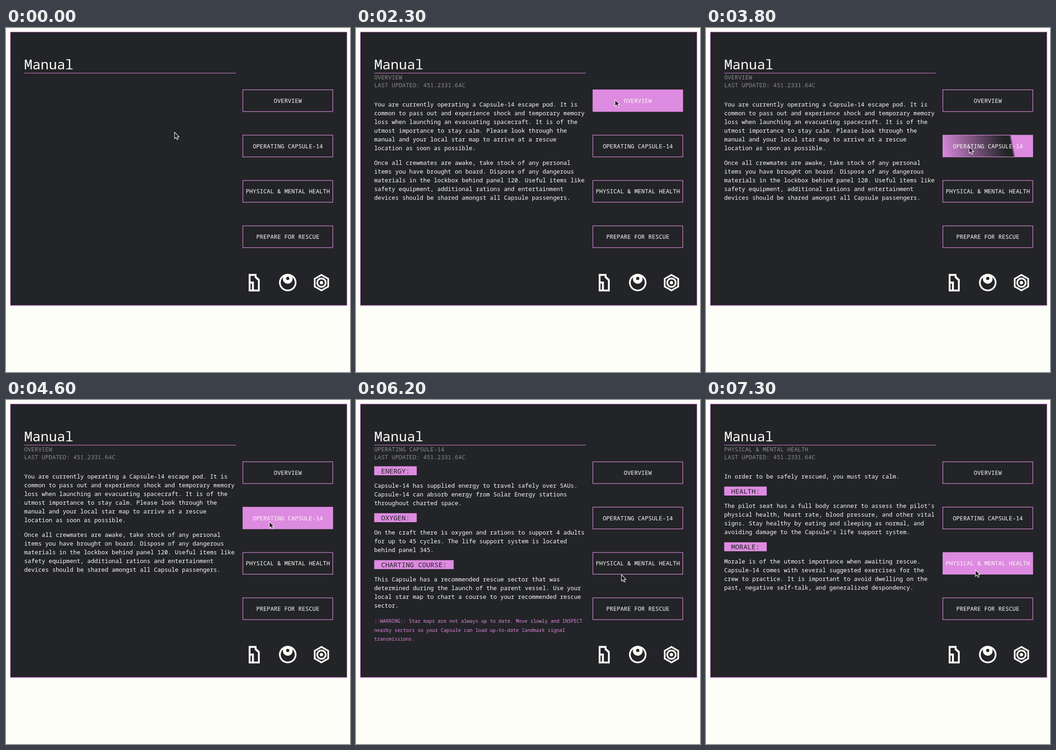
An HTML page that plays this animation: 747x749 px, repeating every 7.7 s.

```html
<!DOCTYPE html>
<html lang="en">
<head>
<meta charset="utf-8">
<title>Manual</title>
<style>
html, body { margin: 0; width: 100%; height: 100%; overflow: hidden; background: #fdfef8; }
svg { display: block; width: 747px; height: 749px; }
text { font-family: "Noto Sans Mono", "DejaVu Sans Mono", monospace; font-size: 12.7px; font-weight: 500; fill: #fcfdf6; }
.title { font-size: 29.7px; font-weight: 400; }
.meta { fill: #8b8b8a; font-weight: 400; }
.head { font-size: 14.85px; font-weight: 400; fill: #232427; }
.warn { font-size: 10.47px; fill: #dd8be0; }
.label { text-anchor: middle; }
</style>
</head>
<body>
<svg id="stage" viewBox="0 0 747 749"></svg>
<script>
const PINK = '#dd8be0', DARK = '#232427', LIGHT = '#fcfdf6';
const LOOP = 7700, FILL_MS = 350;
const stage = document.getElementById('stage');

function add(parent, tag, attrs = {}, content) {
  const el = document.createElementNS('http://www.w3.org/2000/svg', tag);
  for (const key in attrs) el.setAttribute(key, attrs[key]);
  if (content) el.textContent = content;
  return parent.appendChild(el);
}
const text = (parent, x, y, cls, str) => add(parent, 'text', { x, y, class: cls }, str);
const lines = (parent, y, rows, cls = 'body', step = 19.05) =>
  rows.forEach((row, i) => text(parent, 39.5, y + i * step, cls, row));

function heading(parent, y, str) {
  add(parent, 'rect', { x: 39.5, y, width: str.length * 8.91 + 30, height: 19.5, fill: PINK });
  text(parent, 54.5, y + 15.3, 'head', str);
}

function page(topic) {
  const g = add(stage, 'g', { display: 'none' });
  text(g, 39.5, 112, 'meta', topic);
  text(g, 39.5, 128.5, 'meta', 'LAST UPDATED: 451.2331.64C');
  return g;
}

// Panel
add(stage, 'rect', { width: 747, height: 749, fill: '#fdfef8' });
add(stage, 'rect', { x: 9.3, y: 8.6, width: 731.2, height: 595.6, fill: DARK, stroke: PINK, 'stroke-width': 1.2 });
text(stage, 39.5, 89.5, 'title', 'Manual');
add(stage, 'path', { d: 'M39.5 98.2H499', stroke: PINK, 'stroke-width': 1.1 });

// Pages
const topics = ['OVERVIEW', 'OPERATING CAPSULE-14', 'PHYSICAL & MENTAL HEALTH', 'PREPARE FOR RESCUE'];
const [overview, operating, health] = topics.slice(0, 3).map(page);

lines(overview, 171, [
  'You are currently operating a Capsule-14 escape pod. It is',
  'common to pass out and experience shock and temporary memory',
  'loss when launching an evacuating spacecraft. It is of the',
  'utmost importance to stay calm. Please look through the',
  'manual and your local star map to arrive at a rescue',
  'location as soon as possible.'
]);
lines(overview, 298, [
  'Once all crewmates are awake, take stock of any personal',
  'items you have brought on board. Dispose of any dangerous',
  'materials in the lockbox behind panel 120. Useful items like',
  'safety equipment, additional rations and entertainment',
  'devices should be shared amongst all Capsule passengers.'
]);

heading(operating, 144.3, 'ENERGY:');
lines(operating, 190.5, [
  'Capsule-14 has supplied energy to travel safely over 5AUs.',
  'Capsule-14 can absorb energy from Solar Energy stations',
  'throughout charted space.'
]);
heading(operating, 246.5, 'OXYGEN:');
lines(operating, 292.8, [
  'On the craft there is oxygen and rations to support 4 adults',
  'for up to 45 cycles. The life support system is located',
  'behind panel 345.'
]);
heading(operating, 348.7, 'CHARTING COURSE:');
lines(operating, 395, [
  'This Capsule has a recommended rescue sector that was',
  'determined during the launch of the parent vessel. Use your',
  'local star map to chart a course to your recommended rescue',
  'sector.'
]);
lines(operating, 485.3, [
  '::WARNING:: Star maps are not always up to date. Move slowly and INSPECT',
  'nearby sectors so your Capsule can load up-to-date landmark signal',
  'transmissions.'
], 'warn', 19.5);

lines(health, 171, ['In order to be safely rescued, you must stay calm.']);
heading(health, 188.5, 'HEALTH:');
lines(health, 235, [
  'The pilot seat has a full body scanner to assess the pilot’s',
  'physical health, heart rate, blood pressure, and other vital',
  'signs. Stay healthy by eating and sleeping as normal, and',
  'avoiding damage to the Capsule’s life support system.'
]);
heading(health, 309.8, 'MORALE:');
lines(health, 356.3, [
  'Morale is of the utmost importance when awaiting rescue.',
  'Capsule-14 comes with several suggested exercises for the',
  'crew to practice. It is important to avoid dwelling on the',
  'past, negative self-talk, and generalized despondency.'
]);

// Buttons, each with its own slanted sweep
const defs = add(stage, 'defs');
const buttons = topics.map((label, i) => {
  const y = 134.5 + i * 98.75;
  const sweep = add(defs, 'linearGradient', {
    id: 'sweep' + i, gradientUnits: 'userSpaceOnUse',
    x1: -155, y1: y + 53, x2: 0, y2: y + 24
  });
  [[0, PINK], [0.88, DARK], [0.97, DARK], [1, PINK]].forEach(([offset, color]) =>
    add(sweep, 'stop', { offset, 'stop-color': color }));
  const box = add(stage, 'rect', { x: 514.4, y, width: 195.2, height: 47.4, fill: 'none', stroke: PINK, 'stroke-width': 1.2 });
  text(stage, 612, y + 28.4, 'label', label);
  return { sweep, box };
});

// Icons
add(stage, 'path', {
  d: 'M527 535.5H544V541L551 547.5V573.5H527ZM531 539.8V552H538.3V569.4H547V550L540 543.5V539.8ZM531 556.5V569.4H534V556.5Z',
  fill: LIGHT, 'fill-rule': 'evenodd'
});
const disc = (cx, cy, r, fill) => add(stage, 'circle', { cx, cy, r, fill });
const hexagon = (r, fill) => add(stage, 'polygon', {
  points: [0, 1, 2, 3, 4, 5].map(k => {
    const a = (k * 60 - 90) * Math.PI / 180;
    return [685 + r * Math.cos(a), 554.5 + r * Math.sin(a)].join();
  }).join(' '), fill
});
disc(611.8, 554.3, 19, LIGHT);
disc(611.8, 554.3, 15.3, DARK);
disc(611.8, 546.3, 10.6, LIGHT);
disc(611.8, 545.2, 3.5, DARK);
hexagon(19, LIGHT);
hexagon(14.8, DARK);
disc(685, 554.5, 11, LIGHT);
disc(685, 554.5, 7.3, DARK);
disc(685, 554.5, 3.7, LIGHT);

const cursor = add(stage, 'path', {
  d: 'M0 0V14L3.3 10.9L5.5 16L7.9 15L5.8 10.1H10Z',
  fill: '#121214', stroke: LIGHT, 'stroke-width': 1.1, 'stroke-linejoin': 'round'
});

// Timeline: cursor [ms, x, y], hover [button, from, to], page start [ms, group]
const path = [
  [0, 366, 227], [1080, 366, 227], [1600, 550.5, 158], [1850, 562.5, 156.5], [3220, 562.5, 156.5],
  [3900, 572, 265], [5400, 572, 265], [6150, 576.5, 380.5], [6230, 576.5, 380.5], [6650, 585, 370], [LOOP, 585, 370]
];
const hovers = [[0, 1500, 3400], [1, 3690, 5580], [2, 5850, 6140], [2, 6300, LOOP]];
const shows = [[2250, overview], [4800, operating], [6750, health]];

const ease = p => p * p * (3 - 2 * p);

function cursorAt(t) {
  const i = path.findIndex(k => k[0] > t);
  const [t0, x0, y0] = path[i - 1], [t1, x1, y1] = path[i];
  const p = (t - t0) / (t1 - t0), e = ease(p);
  return [x0 + (x1 - x0) * e, y0 + (y1 - y0) * e];
}

function draw(t) {
  shows.forEach(([from, group], i) => {
    const to = i + 1 < shows.length ? shows[i + 1][0] : LOOP;
    group.setAttribute('display', t >= from && t < to ? 'inline' : 'none');
  });
  buttons.forEach(({ sweep, box }, i) => {
    const hover = hovers.find(([b, from, to]) => b === i && t >= from && t < to);
    if (!hover) return box.setAttribute('fill', 'none');
    const p = Math.min((t - hover[1]) / FILL_MS, 1);
    sweep.setAttribute('gradientTransform', `translate(${720 - 220 * ease(p)} 0)`);
    box.setAttribute('fill', p < 1 ? `url(#sweep${i})` : PINK);
  });
  cursor.setAttribute('transform', `translate(${cursorAt(t)})`);
}

function tick() {
  draw(performance.now() % LOOP);
  requestAnimationFrame(tick);
}
tick();
</script>
</body>
</html>
```
